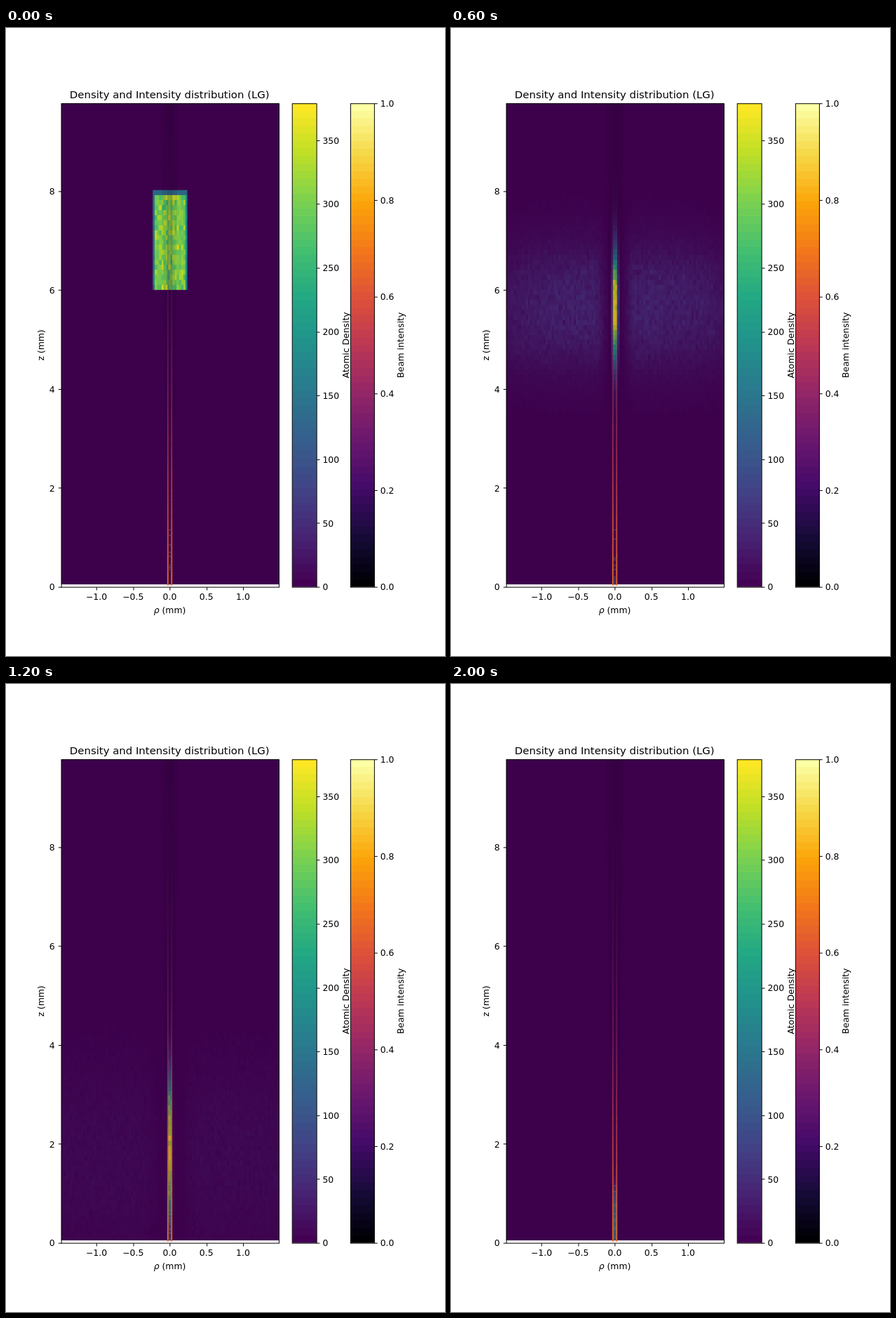
Animation of 626x894 px, one loop 2100 ms. Source, as an HTML page with a canvas:

```html
<!DOCTYPE html>
<html lang="en">
<head>
<meta charset="utf-8">
<title>Density and Intensity distribution (LG)</title>
<style>
html, body { margin: 0; width: 100%; height: 100%; overflow: hidden; background: #fff; }
canvas, svg { position: absolute; left: 0; top: 0; width: 626px; height: 894px; }
text { font: 13.89px "DejaVu Sans", sans-serif; fill: #000; }
.title { font-size: 16.67px; }
.axis { stroke: #000; stroke-width: 1.11; fill: none; }
</style>
</head>
<body>
<canvas id="plot" width="700" height="1000"></canvas>
<svg id="labels" viewBox="0 0 700 1000" preserveAspectRatio="none"></svg>
<script>
// A 7 x 10 inch figure at 100 dpi, shown scaled to the stage.
const ctx = document.getElementById('plot').getContext('2d');
const svg = document.getElementById('labels');

const STEP = 100, STEPS = 21;
const LEFT = 88, RIGHT = 435, TOP = 120, BOTTOM = 890, FLOOR = 886;
const MID = 261.1, MM_X = 116.85, MM_Z = 78.77;
const COLS = 100, ROWS = 97, CELL_W = 3.472, CELL_H = 7.95, GRID_MID = 261.7;
const SHADE = 0.9;
const BARS = [{ x: 456.5, w: 39 }, { x: 549.5, w: 38 }];

const viridis = ['440154', '482475', '414487', '355f8d', '2a788e', '21918c',
  '22a884', '44bf70', '7ad151', 'bddf26', 'fde725'].map(rgb);
const inferno = ['000004', '160b39', '420a68', '6a176e', '932667', 'bc3754',
  'dd513a', 'f37819', 'fca50a', 'f6d746', 'fcffa4'].map(rgb);

// step, centre (mm), half length (mm), softness (mm), strength of the guided column
const column = [
  [1, 6.97, 1.0, 0.06, 1.0], [2, 6.88, 0.97, 0.11, 1.1], [4, 6.52, 0.8, 0.24, 1.1],
  [8, 4.8, 0.9, 0.38, 1.2], [12, 1.9, 1.25, 0.32, 0.95],
  [16, 0.4, 0.93, 0.09, 0.76], [20, 0.2, 0.85, 0.12, 0.4]
];

function rgb(hex) {
  return [0, 2, 4].map(k => parseInt(hex.slice(k, k + 2), 16));
}

function shade(map, v, dim = 1, alpha = 1) {
  const p = Math.min(0.9999, Math.max(0, v)) * (map.length - 1);
  const k = Math.floor(p);
  const c = map[k].map((a, m) => Math.round((a + (map[k + 1][m] - a) * (p - k)) * dim));
  return `rgba(${c},${alpha})`;
}

function hash(a, b, c) {
  let h = Math.imul(a + 11, 374761393) ^ Math.imul(b + 7, 668265263) ^ Math.imul(c + 3, 2147483647);
  h = Math.imul(h ^ (h >>> 13), 1274126177);
  h = Math.imul(h ^ (h >>> 16), 2246822519);
  return ((h ^ (h >>> 15)) >>> 0) / 4294967296;
}

// roughly normal, unit spread
function jitter(i, j, n) {
  return (hash(i, j, n) + hash(i, j, n + 50) + hash(i, j, n + 100) - 1.5) * 2;
}

const soft = u => 1 / (1 + Math.exp(-u));
const slab = (z, centre, half, s) => soft((z - centre + half) / s) * soft((centre + half - z) / s);

function columnAt(n) {
  let k = 0;
  while (k < column.length - 2 && n > column[k + 1][0]) k++;
  const a = column[k], b = column[k + 1];
  const u = (n - a[0]) / (b[0] - a[0]);
  return a.map((v, m) => v + (b[m] - v) * u);
}

function startDensity(i, j) {
  if (i < 42 || i > 57 || j < 59 || j > 78) return 0;
  if (j === 78) return 0.36;
  if (i === 42) return 0.42 + 0.04 * jitter(i, j, 0);
  if (i === 57) return 0.52 + 0.04 * jitter(i, j, 0);
  return 0.81 + 0.06 * jitter(i, j, 0);
}

// free fall plus thermal spread, with a void beside the beam
function cloudDensity(i, j, x, z, n) {
  const centre = 7 - 0.0367 * n * n;
  const width = 0.09 + 0.262 * n + 0.08 * (centre - z);
  const r = Math.abs(x);
  const peak = Math.min(0.62, 0.9 / n * (1 - 0.045 * n));
  const d = peak * slab(z, centre, 1, 0.062 * n)
    * soft((width - r) / (0.025 * n))
    * Math.max(0, 1 - 0.35 * (r / width) ** 2)
    * soft((r - 0.11 - 0.011 * n) / (0.006 * n));
  return d * (1 + (0.05 + 0.02 * n) * jitter(i, j, n));
}

function density(i, j, n, guide) {
  if (n === 0) return startDensity(i, j);
  const x = (i + 0.5 - COLS / 2) * CELL_W / MM_X;
  const z = (BOTTOM - FLOOR + (j + 0.5) * CELL_H) / MM_Z;
  let d = cloudDensity(i, j, x, z, n);
  if (i >= 48 && i <= 51) {
    const [, centre, half, s, strength] = guide;
    const c = strength * slab(z, centre, half, s) * (1 + 0.07 * jitter(i, j, n));
    d += i === 49 || i === 50 ? c : c * Math.max(0.02, 0.34 - 0.028 * n);
  }
  return d;
}

function drawDensity(n) {
  const guide = columnAt(n);
  ctx.fillStyle = shade(viridis, 0, SHADE);
  ctx.fillRect(LEFT, TOP, RIGHT - LEFT, FLOOR - TOP);
  for (let j = 0; j < ROWS; j++) {
    const y = Math.round(FLOOR - (j + 1) * CELL_H);
    const h = Math.round(FLOOR - j * CELL_H) - y;
    for (let i = 0; i < COLS; i++) {
      const d = density(i, j, n, guide);
      if (d < 0.004) continue;
      const x = Math.round(GRID_MID + (i - COLS / 2) * CELL_W);
      ctx.fillStyle = shade(viridis, d, SHADE + 0.07 * Math.min(1, d));
      ctx.fillRect(x, y, Math.round(GRID_MID + (i + 1 - COLS / 2) * CELL_W) - x, h);
    }
  }
}

function drawWing(base, slope, alpha) {
  const span = (FLOOR - TOP) / MM_Z;
  ctx.fillStyle = `rgba(10,0,12,${alpha})`;
  ctx.beginPath();
  ctx.moveTo(MID - base, FLOOR);
  ctx.lineTo(MID - base - slope * span, TOP);
  ctx.lineTo(MID + base + slope * span, TOP);
  ctx.lineTo(MID + base, FLOOR);
  ctx.fill();
}

function drawBeam(n) {
  drawWing(4, 1, 0.09);
  drawWing(2, 0.3, 0.06);
  for (let y = FLOOR + 2; y > TOP; y -= 3) {
    const z = (BOTTOM - y) / MM_Z;
    const v = 0.68 * Math.exp(-z / 9) + 0.04 * (hash(y, 5, n) - 0.5);
    const alpha = Math.exp(-((z / 5.5) ** 2));
    ctx.fillStyle = shade(inferno, v, 1, 0.95 * alpha);
    ctx.fillRect(MID - 4.1, y - 3, 2, 3);
    ctx.fillRect(MID + 2.1, y - 3, 2, 3);
    ctx.fillStyle = shade(inferno, v * 0.6, 1, 0.2 * alpha);
    ctx.fillRect(MID - 2.1, y - 3, 4.2, 3);
    if (z < 1.3 && hash(y, 9, n) < 0.35 * (1.5 - z)) {
      ctx.fillStyle = 'rgba(80,140,145,0.6)';
      ctx.fillRect(MID - 1, y - 3, 2, 2);
    }
  }
}

function drawHeat(n) {
  ctx.fillStyle = '#fff';
  ctx.fillRect(LEFT, TOP, RIGHT - LEFT, BOTTOM - TOP);
  ctx.save();
  ctx.beginPath();
  ctx.rect(LEFT, TOP, RIGHT - LEFT, BOTTOM - TOP);
  ctx.clip();
  drawDensity(n);
  drawBeam(n);
  ctx.restore();
}

function drawBar({ x, w }, map) {
  const bands = 64, h = (BOTTOM - TOP) / bands;
  for (let k = 0; k < bands; k++) {
    const y = Math.round(BOTTOM - (k + 1) * h);
    ctx.fillStyle = shade(map, k / (bands - 1));
    ctx.fillRect(x, y, w, Math.round(BOTTOM - k * h) - y);
  }
}

function add(tag, attrs, content = '') {
  const el = document.createElementNS('http://www.w3.org/2000/svg', tag);
  for (const k in attrs) el.setAttribute(k, attrs[k]);
  el.textContent = content;
  svg.append(el);
  return el;
}

const label = (s, x, y, anchor = 'middle', extra = {}) =>
  add('text', { x, y, 'text-anchor': anchor, ...extra }, s);
const upright = (s, x, y) =>
  label(s, 0, 0, 'middle', { transform: `translate(${x} ${y}) rotate(-90)` });
const line = d => add('path', { d, class: 'axis' });
const box = (x, w) => add('rect', { x, y: TOP + 0.5, width: w, height: BOTTOM - TOP, class: 'axis' });
const snap = v => Math.floor(v + 0.5) + 0.5;

function tickRight(s, { x, w }, y) {
  line(`M${x + w} ${snap(y)}h4.9`);
  label(s, x + w + 9.3, y + 5.3, 'start');
}

function drawFrame() {
  label('Density and Intensity distribution (LG)', 260.8, 111.7, 'middle', { class: 'title' });
  box(LEFT + 0.5, RIGHT - LEFT);
  BARS.forEach(({ x, w }) => box(x, w));
  for (let v = -1; v <= 1; v += 0.5) {
    const x = MID + v * MM_X;
    line(`M${snap(x)} ${BOTTOM + 0.5}v4.9`);
    label(v.toFixed(1).replace('-', '\u2212'), x, 911);
  }
  for (let v = 0; v <= 8; v += 2) {
    const y = BOTTOM - v * MM_Z;
    line(`M${LEFT + 0.5} ${snap(y)}h-4.9`);
    label(v, 77.9, y + 5.3, 'end');
  }
  for (let v = 0; v <= 350; v += 50) tickRight(v, BARS[0], BOTTOM - v * 2.032);
  for (let k = 0; k <= 5; k++) tickRight((k / 5).toFixed(1), BARS[1], BOTTOM - k * 154);
  const rho = label('', MID, 932.3);
  rho.innerHTML = '<tspan font-style="italic">\u03c1</tspan> (mm)';
  upright('z (mm)', 60, 505);
  upright('Atomic Density', 547.1, 505);
  upright('Beam intensity', 634.5, 505);
}

let shown = -1;
function play() {
  const n = Math.floor(performance.now() / STEP) % STEPS;
  if (n !== shown) drawHeat(shown = n);
  requestAnimationFrame(play);
}

drawBar(BARS[0], viridis);
drawBar(BARS[1], inferno);
drawFrame();
play();
</script>
</body>
</html>
```
